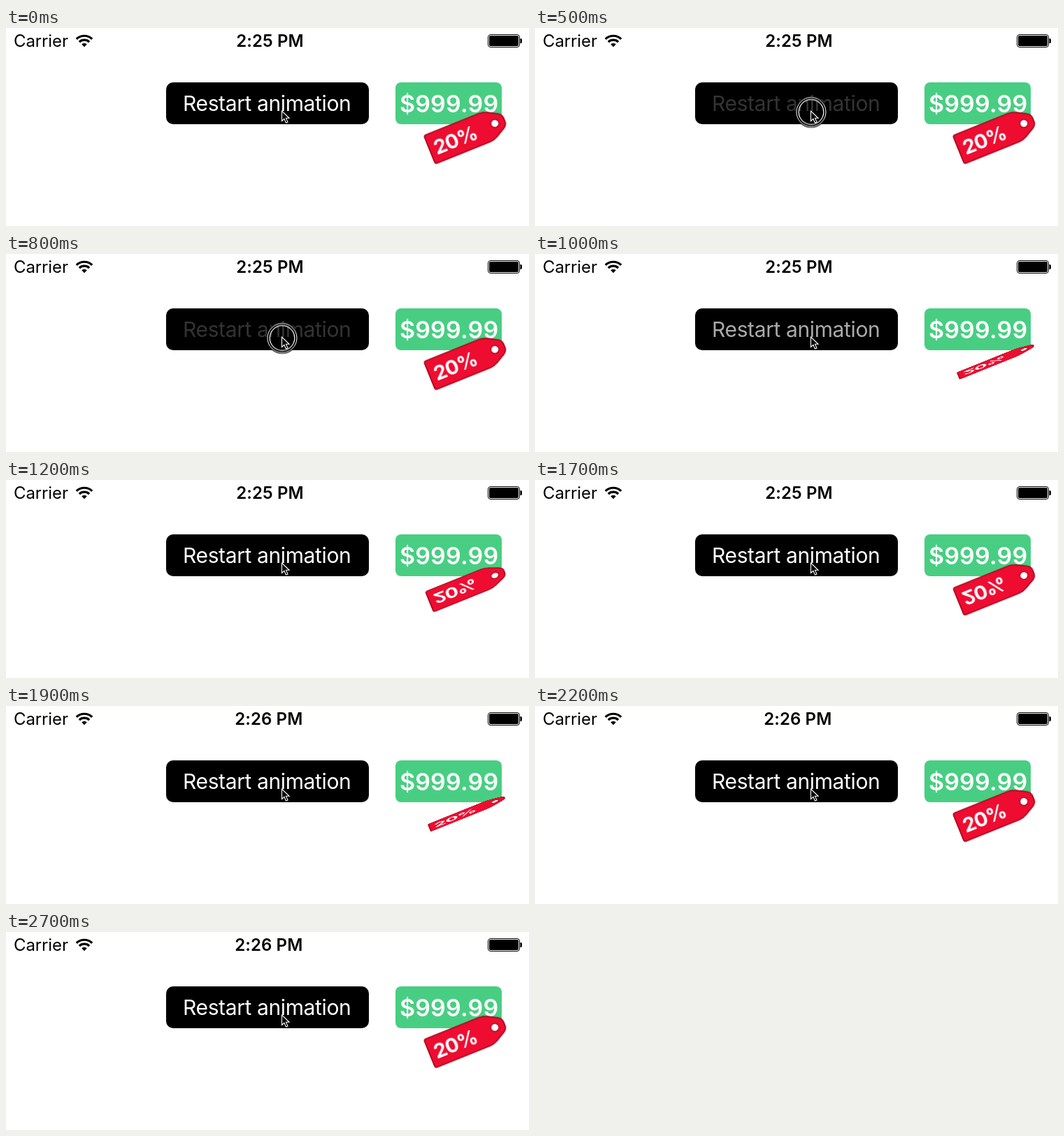
An HTML page for the animation above (2800 ms loop, 748 by 284 pixels).

```html
<!DOCTYPE html>
<html lang="en">
<head>
<meta charset="utf-8">
<title>Price tag flip</title>
<style>
  html, body { margin: 0; width: 100%; height: 100%; overflow: hidden; background: #fff; }
  svg { position: absolute; display: block; font-family: Inter, "Open Sans", sans-serif; }
  .stage { left: 0; top: 0; }
  .mid { text-anchor: middle; }
  .label, .ring, .early, .late, .tag { animation: 2.8s step-end infinite; }

  .label { animation-name: press; }
  .ring { animation-name: click; }
  .early { animation-name: early; }
  .late { animation-name: late; }
  .tag {
    left: 604.6px; top: 151px; overflow: visible;
    transform-origin: 0 50%;
    animation-name: flip;
  }

  @keyframes press {
    0% { opacity: 1; }
    14.28% { opacity: .2; }
    32.14% { opacity: .37; }
    35.71% { opacity: .67; }
    39.28% { opacity: .92; }
    42.85%, 100% { opacity: 1; }
  }
  @keyframes click {
    0%, 32.14%, 100% { opacity: 0; }
    14.28% { opacity: 1; }
  }
  @keyframes early {
    0% { opacity: 1; }
    64.28%, 100% { opacity: 0; }
  }
  @keyframes late {
    0% { opacity: 0; }
    64.28%, 100% { opacity: 1; }
  }
  /* two even turns about the tag's long axis, ten pictures a second */
  @keyframes flip {
    0% { transform: rotate(-22deg) rotateX(0deg); }
    32.14% { transform: rotate(-22deg) rotateX(44deg); animation-timing-function: steps(11, end); }
    71.42% { transform: rotate(-22deg) rotateX(705deg); }
    75%, 100% { transform: rotate(-22deg) rotateX(720deg); }
  }
</style>
</head>
<body>
<svg class="stage" width="748" height="284" viewBox="0 0 748 284">
  <text x="11" y="27" font-size="24" letter-spacing="-.1">Carrier</text>
  <g fill="none" stroke="#000" stroke-width="3.2">
    <path d="M100.8 15.8a16 16 0 0 1 22.4 0"/>
    <path d="M104.9 20.1a10.2 10.2 0 0 1 14.2 0"/>
    <path d="M112 27.2l-3.8-3.9a5.4 5.4 0 0 1 7.6 0z" fill="#000" stroke="none"/>
  </g>
  <g class="mid" font-size="24" font-weight="600" letter-spacing=".1">
    <text class="early" x="377.5" y="27">2:25 PM</text>
    <text class="late" x="375.8" y="27">2:26 PM</text>
  </g>
  <rect x="689.5" y="9.5" width="45" height="18" rx="3.5" fill="none" stroke="#000"/>
  <rect x="691" y="11" width="42" height="15" rx="2"/>
  <path d="M735.5 15h1q1.5 .5 1.5 2v3q0 1.500 -1.500 2h-1z"/>

  <rect x="229" y="78" width="290" height="60" rx="10"/>
  <text class="label mid" x="373.2" y="119" font-size="30" letter-spacing="-.38" fill="#fff">Restart animation</text>

  <rect x="557" y="78" width="152" height="60" rx="8" fill="#48ce82"/>
  <text class="mid" x="633.6" y="121" font-size="34" font-weight="600" letter-spacing=".15" fill="#fff">$999.99</text>
</svg>

<svg class="tag" width="120" height="48" viewBox="0 -24 120 48">
  <path d="M4 -21.700H86Q92 -21.700 96.500 -19L110.500 -11.500Q116 -8 116 -3V3Q116 8 110.500 11.500L96.500 19Q92 21.700 86 21.700H4Q1 21.700 1 18.700V-18.700Q1 -21.700 4 -21.700Z"
    fill="#ee0d31" stroke="#b30a20" stroke-width="2"/>
  <circle cx="101.600" r="5.800" fill="#fff" stroke="#b30a20" stroke-width="1.500"/>
  <text class="mid" x="40.200" y="10.500" font-size="29" font-weight="700" letter-spacing="-1" fill="#fff">20%</text>
</svg>

<svg class="stage" width="748" height="284" viewBox="0 0 748 284">
  <g class="ring" fill="none" stroke="#fff" transform="translate(395 120.500)">
    <circle r="20" stroke="#000" stroke-width="5"/>
    <circle r="21"/>
    <circle r="17.800" stroke-width="1.200"/>
  </g>
  <path d="M394.500 119v14.500l3.400 -3.200 2.500 5.700 2.600 -1.100 -2.500 -5.600h4.600z" stroke="#fff" stroke-width="1.100"/>
</svg>
</body>
</html>
```
